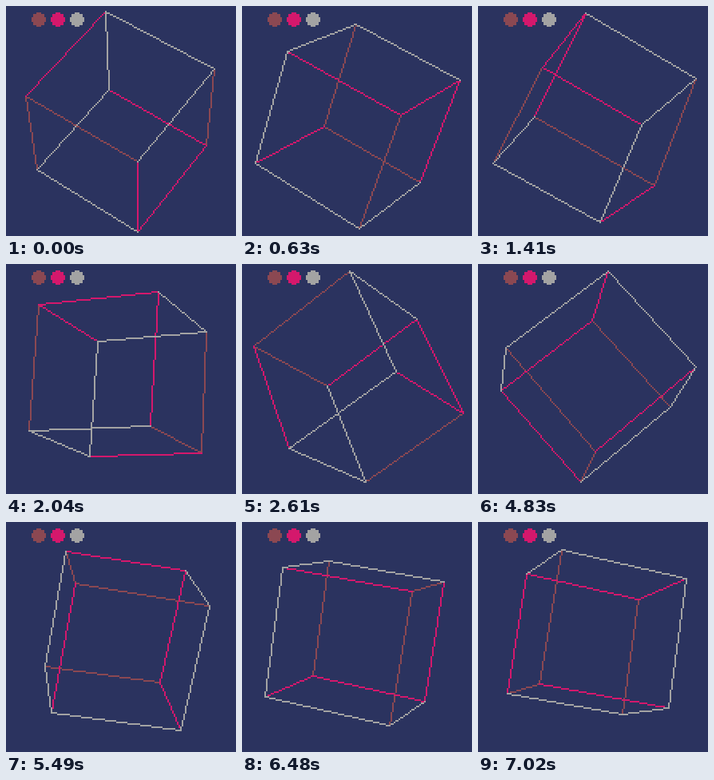
Write an HTML page with a canvas that moves like this. It is 288 px wide and 288 px high and loops after 9000 ms.

```html
<!DOCTYPE html>
<html>
<head>
<meta charset="utf-8">
<style>
html, body { margin: 0; width: 100%; height: 100%; overflow: hidden; background: #2b335f; }
canvas { display: block; width: 288px; height: 288px; image-rendering: pixelated; }
</style>
</head>
<body>
<canvas id="stage" width="144" height="144"></canvas>
<script>
const ctx = document.getElementById('stage').getContext('2d');
const BG = '#2b335f', BROWN = '#8b4852', PINK = '#d4186c', GREY = '#a3a3a3';
const LOOP = 9000, TICK = 30, MID = 72, HALF = 40, DEPTH = 15;

// Vertex bits 0, 1, 2 mark the negative side along x, y, z.
const PATHS = [
  [BROWN, [5, 4, 6]], [BROWN, [1, 3]],
  [PINK, [2, 3, 7, 5]], [PINK, [0, 4]],
  [GREY, [5, 1, 0, 2, 6, 7]]
];

// Turns of 10 degrees per tick: axis, start time, ticks, direction.
const START = [120, 200, 30];
const TURNS = [
  [0, 30, 21, 1],
  [1, 810, 32, -1], [1, 1890, 32, 1], [1, 3240, 13, -1],
  [2, 4560, 39, -1], [2, 6030, 34, 1]
];

function anglesAt(t) {
  const angles = [...START];
  for (const [axis, from, ticks, dir] of TURNS) {
    const done = Math.floor((t - from) / TICK + 1e-6) + 1;
    angles[axis] += 10 * dir * Math.max(0, Math.min(ticks, done));
  }
  return angles.map(a => a * Math.PI / 180);
}

function turn(u, v, a) {
  const c = Math.cos(a), s = Math.sin(a);
  return [u * c - v * s, u * s + v * c];
}

function project(id, [ax, ay, az]) {
  let [x, y, z] = [1, 2, 4].map(bit => id & bit ? -1 : 1);
  [y, z] = turn(y, z, ax);
  [z, x] = turn(z, x, ay);
  [x, y] = turn(x, y, az);
  const scale = HALF / (1 + z / DEPTH);
  return [Math.round(MID + x * scale), Math.round(MID + y * scale)];
}

function line([x1, y1], [x2, y2]) {
  const dx = x2 - x1, dy = y2 - y1;
  const n = Math.max(Math.abs(dx), Math.abs(dy)) || 1;
  for (let i = 0; i <= n; i++) {
    ctx.fillRect(Math.round(x1 + dx * i / n), Math.round(y1 + dy * i / n), 1, 1);
  }
}

function dot(cx, cy, color) {
  ctx.fillStyle = color;
  for (let y = -4; y <= 4; y++) {
    const w = Math.floor(Math.sqrt(18 - y * y));
    ctx.fillRect(cx - w, cy + y, 2 * w + 1, 1);
  }
}

function draw(t) {
  ctx.fillStyle = BG;
  ctx.fillRect(0, 0, 144, 144);
  [BROWN, PINK, GREY].forEach((color, i) => dot(20 + 12 * i, 8, color));
  const angles = anglesAt(t);
  for (const [color, ids] of PATHS) {
    ctx.fillStyle = color;
    const points = ids.map(id => project(id, angles));
    for (let i = 1; i < points.length; i++) line(points[i - 1], points[i]);
  }
}

const began = performance.now();
function frame() {
  draw((performance.now() - began) % LOOP);
  requestAnimationFrame(frame);
}
frame();
</script>
</body>
</html>
```
